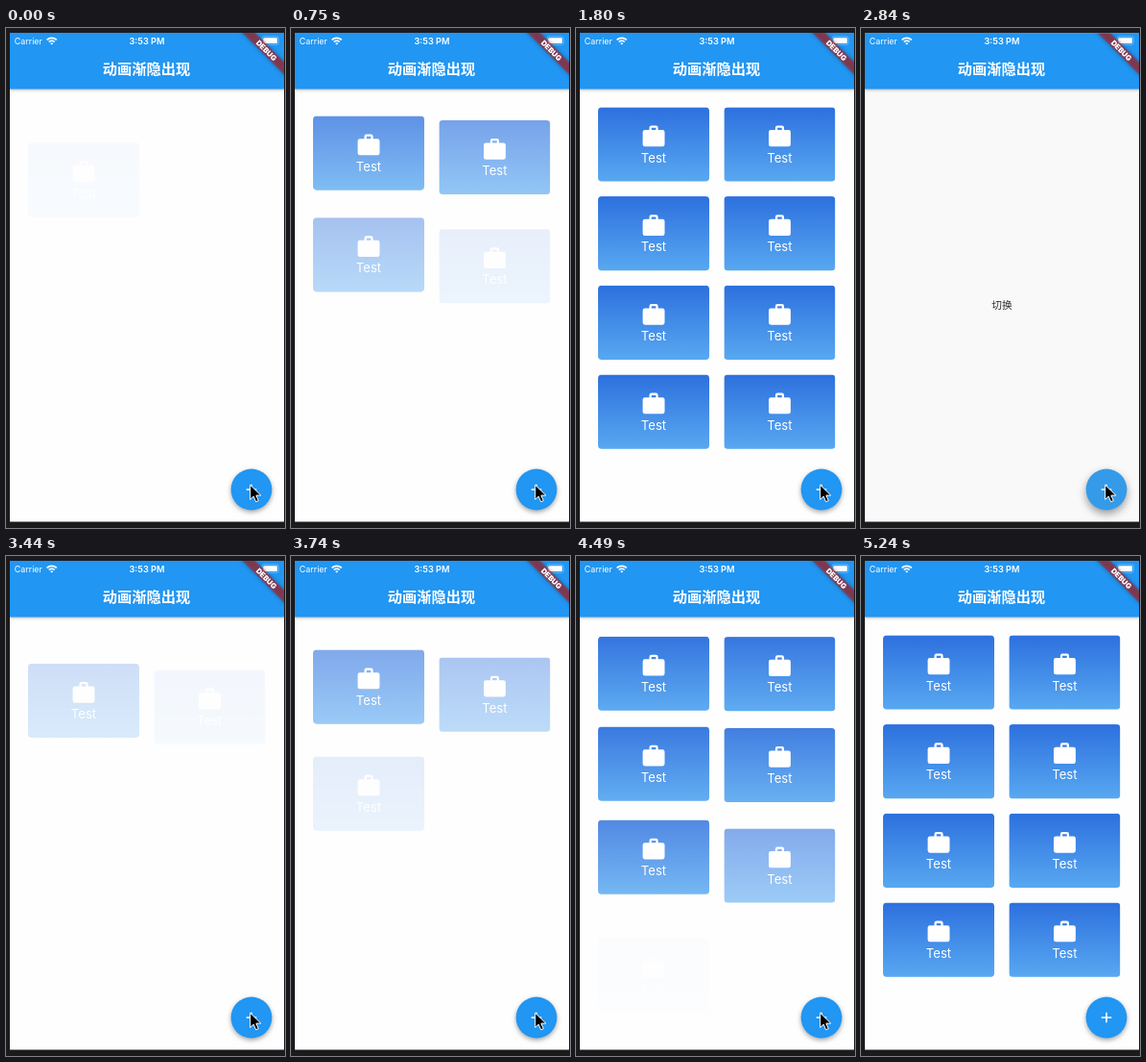
Animation of 291x520 px, one loop 5560 ms. Source, as an HTML page:

```html
<!DOCTYPE html>
<html lang="zh">
<head>
<meta charset="utf-8">
<style>
  html, body { margin: 0; width: 100%; height: 100%; overflow: hidden; background: #1b1b1d; }
  svg { display: block; width: 100vw; height: 100vh; }
  text { font-family: Inter, "Noto Sans", sans-serif; fill: #fff; }
  .mid { text-anchor: middle; }
  .cjk { font-family: "Noto Sans CJK SC", "Noto Sans CJK", sans-serif; }
  #bar { filter: drop-shadow(0 1.5px 1.5px rgba(0, 0, 0, .28)); }
  #fab { fill: #2196f3; filter: drop-shadow(0 2.5px 2.6px rgba(0, 0, 0, .36)); }
  #fab.down { fill: #359be9; filter: drop-shadow(0 4.5px 4.5px rgba(0, 0, 0, .38)); }
  #band { filter: drop-shadow(0 0 2.2px rgba(0, 0, 0, .5)); }
</style>
</head>
<body>
<svg viewBox="0 0 291 520">
  <defs>
    <linearGradient id="sky" x2="0" y2="1">
      <stop stop-color="#2d70de"/>
      <stop offset="1" stop-color="#58a8f1"/>
    </linearGradient>
    <clipPath id="screen"><rect x="4" y="5.5" width="286" height="508"/></clipPath>
    <g id="card">
      <rect width="116" height="77.2" rx="3.8" fill="url(#sky)"/>
      <path transform="translate(44.3 16.8) scale(1.145)" fill="#fff" fill-rule="evenodd"
        d="M20 6h-4V4a2 2 0 0 0-2-2h-4a2 2 0 0 0-2 2v2H4a2 2 0 0 0-2 2v11a2 2 0 0 0 2 2h16a2 2 0 0 0 2-2V8a2 2 0 0 0-2-2zm-6 0h-4V4h4z"/>
      <text class="mid" x="58" y="57.3" font-size="13.1">Test</text>
    </g>
  </defs>
  <rect width="291" height="520" fill="#1b1b1d"/>
  <g clip-path="url(#screen)">
    <rect id="page" x="4" y="5" width="286" height="509" fill="#fefefe"/>
    <g id="cards"></g>
    <text id="label" class="mid cjk" x="147" y="292" font-size="10.7" style="fill:#2b2b2b">切换</text>
    <rect id="bar" x="4" y="0" width="286" height="63.5" fill="#2196f3"/>
    <text x="8.8" y="16.6" font-size="8.9">Carrier</text>
    <g fill="none" stroke="#fff" stroke-width="1.7">
      <path d="M42.6 12.4a7.2 7.2 0 0 1 10.2 0M44.7 14.5a4.3 4.3 0 0 1 6 0"/>
      <path d="M47.7 17.6l-1.6-1.7a2.3 2.3 0 0 1 3.2 0z" fill="#fff" stroke="none"/>
    </g>
    <text class="mid" x="147" y="16.6" font-size="9.2" font-weight="600">3:53 PM</text>
    <rect x="266.9" y="8.9" width="17.4" height="8.4" rx="2.2" fill="none" stroke="#fff" stroke-opacity=".45" stroke-width=".7"/>
    <rect x="268.3" y="10.2" width="14.6" height="5.8" rx="1.1" fill="#fff"/>
    <text class="mid cjk" x="146.6" y="47.7" font-size="15.25" font-weight="600">动画渐隐出现</text>
    <g transform="translate(290 5) rotate(45)">
      <rect id="band" x="-40" y="21.4" width="80" height="9.2" fill="#b71c1c" fill-opacity=".63"/>
      <text class="mid" x="0" y="28.8" font-size="7.7" font-weight="900">DEBUG</text>
    </g>
    <circle id="fab" cx="256" cy="480" r="21.4"/>
    <path d="M250.7 480h10.6M256 474.7v10.6" stroke="#fff" stroke-width="1.6"/>
  </g>
  <path id="cursor" d="M0 0v15.2l3.5-3.3 2.4 5.6 2.7-1.1-2.4-5.5h4.9z" fill="#000" stroke="#fff" stroke-width="1" stroke-linejoin="round"/>
</svg>
<script>
const LOOP = 5560, STEP = 150, RUN = 2000, COUNT = 8;
const PRESS = [2250, 2840], HIDE = 2400, REPLAY = 2948, LEAD = 230;
const $ = id => document.getElementById(id);

function make(tag, attrs, parent) {
  const el = document.createElementNS('http://www.w3.org/2000/svg', tag);
  for (const k in attrs) el.setAttribute(k, attrs[k]);
  return parent.appendChild(el);
}

// Each card starts an eighth of the run later; all finish together.
const anims = Array.from({ length: COUNT }, (_, i) => {
  const x = 23 + (i % 2) * 131.4, y = 82.4 + (i >> 1) * 92.7;
  const slot = make('g', { transform: `translate(${x} ${y})` }, $('cards'));
  const card = make('g', {}, slot);
  make('use', { href: '#card' }, card);
  const delay = RUN * i / COUNT;
  const anim = card.animate([
    { transform: 'translate(0px, 38.2px)', opacity: 0 },
    { transform: 'translate(0px, 0px)', opacity: 1 }
  ], { delay, duration: RUN - delay, easing: 'cubic-bezier(.4, 0, .2, 1)', fill: 'both' });
  anim.pause();
  return anim;
});

const snap = t => {
  const base = t < PRESS[1] ? 0 : PRESS[1];
  return base + Math.floor((t - base) / STEP) * STEP;
};

function draw(time) {
  const t = snap(time);
  const empty = time >= HIDE && t < REPLAY;
  const run = time < HIDE ? t + LEAD : t - REPLAY;
  for (const a of anims) a.currentTime = Math.max(0, Math.min(RUN, run));
  $('cards').style.display = empty ? 'none' : '';
  $('label').style.display = empty ? '' : 'none';
  $('page').setAttribute('fill', empty ? '#f9f9f9' : '#fefefe');
  $('fab').classList.toggle('down', PRESS.includes(t));
  $('cursor').style.display = t >= 5240 ? 'none' : '';
  $('cursor').setAttribute('transform', `translate(254.7 ${t >= 5090 ? 508 : 475.2})`);
}

const start = performance.now();
function tick() {
  draw((performance.now() - start) % LOOP);
  requestAnimationFrame(tick);
}
tick();
</script>
</body>
</html>
```
